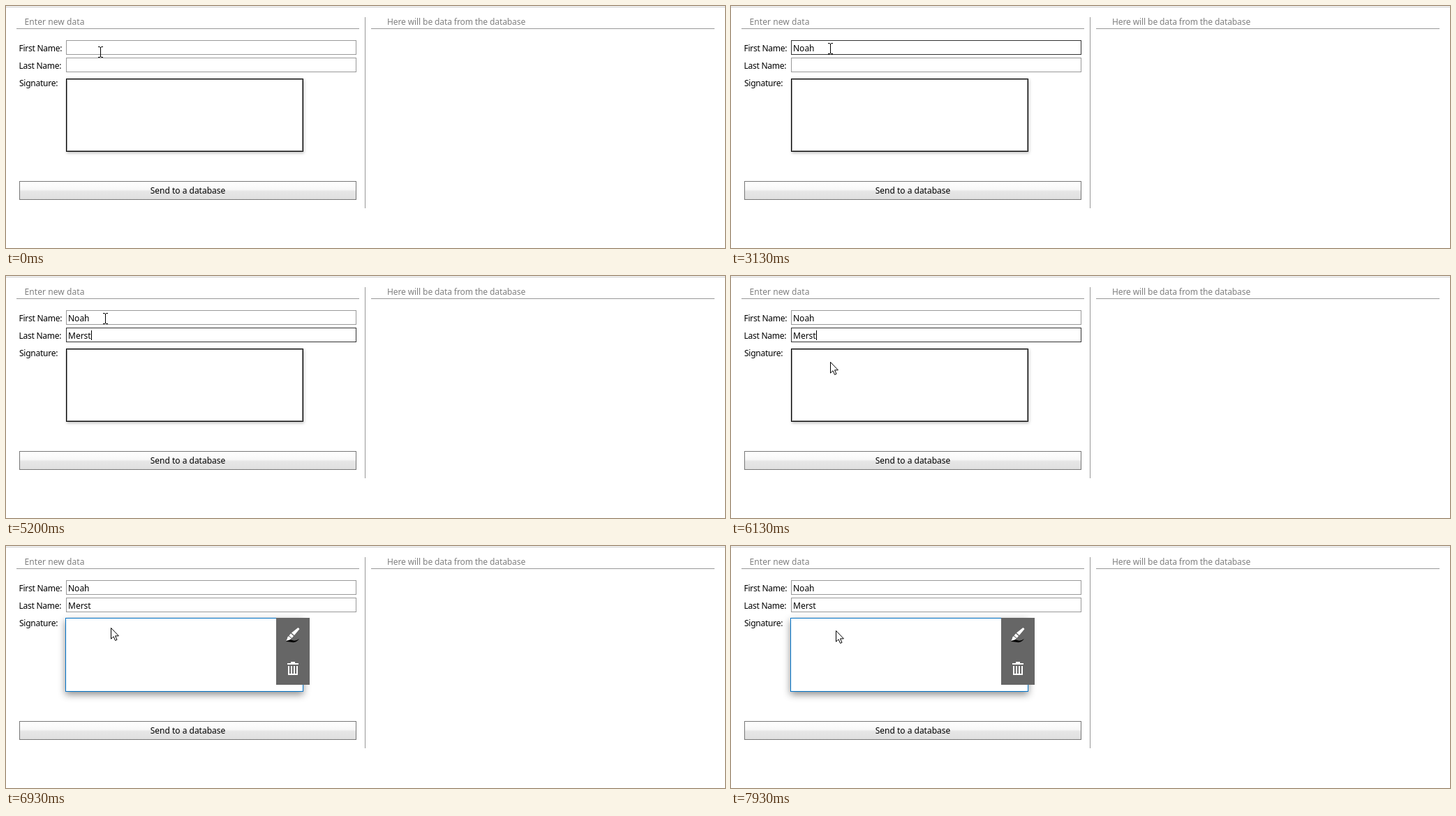
Animation of 1030 by 347 pixels, one loop 8000 ms. Source, as an HTML page:

```html
<!DOCTYPE html>
<html lang="en">
<head>
<meta charset="utf-8">
<title>Signature form</title>
<style>
  html, body { margin: 0; width: 100%; height: 100%; overflow: hidden; background: #fff; }
  svg { position: absolute; left: 0; top: 0; }
  text { font: 12px "Noto Sans", "Open Sans", sans-serif; white-space: pre; }
  .head { fill: #808080; }
  .label { letter-spacing: -.25px; }
  .rule { stroke: #999; }
  .field { fill: #fff; stroke: #999; }
  .field.focus { stroke: #333; }

  #pad {
    position: absolute; box-sizing: border-box;
    left: 86px; top: 104px; width: 340px; height: 105px;
    background: #fff; border: 1px solid #000;
    box-shadow: inset 0 0 0 1px rgba(0,0,0,.4), 1px 2px 4px rgba(0,0,0,.25);
  }
  #pad.active {
    left: 85px; top: 103px; width: 341px; height: 106px;
    border-color: #0072c6;
    box-shadow: 0 4px 10px rgba(0,0,0,var(--shade));
  }
</style>
</head>
<body>
<div id="pad"></div>
<svg width="1030" height="347" viewBox="0 0 1030 347">
  <defs>
    <linearGradient id="face" x2="0" y2="1">
      <stop offset="0" stop-color="#fff"/>
      <stop offset=".45" stop-color="#f7f7f7"/>
      <stop offset=".55" stop-color="#e6e6e6"/>
      <stop offset="1" stop-color="#e0e0e0"/>
    </linearGradient>
  </defs>

  <path d="M0 1.5H1030" stroke="#ccc"/>
  <path class="rule" d="M15 32.5H506M523 32.5H1015M514.5 16V290"/>
  <text class="head" x="26.5" y="27" letter-spacing=".08">Enter new data</text>
  <text class="head" x="546" y="27" letter-spacing="-.1">Here will be data from the database</text>

  <text class="label" x="18.5" y="65">First Name:</text>
  <text class="label" x="18.5" y="90">Last Name:</text>
  <text class="label" x="19" y="115">Signature:</text>
  <rect class="field" x="86.5" y="49.5" width="415" height="20"/>
  <rect class="field" x="86.5" y="74.5" width="415" height="20"/>
  <text class="value" x="89" y="65"></text>
  <text class="value" x="89" y="90"></text>
  <path id="caret" d="M.5 0V14" stroke="#000"/>

  <rect x="19.5" y="251.5" width="482" height="26" fill="url(#face)" stroke="#777"/>
  <text x="260.5" y="269" text-anchor="middle">Send to a database</text>

  <g id="tools">
    <rect x="387" y="103" width="48" height="96" fill="#666"/>
    <path d="M401 137Q405 133 410 135T420 133Q416 139 410 138T401 137Z" fill="#000"/>
    <path d="M418.5 117L420.5 119 413 128 409 124.5ZM408 125.5L412 129 409.5 132 405.5 128.5ZM404.8 129.2L408.8 132.5Q406 136 401 135.5 403 134 403 132 403.3 130 404.8 129.2Z" fill="#fff"/>
    <path d="M403 169H419M408 167H414" stroke="#fff" stroke-width="2"/>
    <path d="M405 172V184H417V172M409 172V184M413 172V184" fill="none" stroke="#fff" stroke-width="2"/>
  </g>

  <path id="beam" d="M-3 -7.5H-1L.5 -6.5 2 -7.5H4M.5 -7V7M-3 7.5H-1L.5 6.5 2 7.5H4" fill="none" stroke="#000"/>
  <path id="arrow" d="M.5 .5V16.2L4 12.8 6.6 18.5 9 17.4 6.5 11.9H11.4Z" fill="#fff" stroke="#000"/>
</svg>

<script>
  const LOOP = 8000;
  const FRAME = 1000 / 15;
  const BLINK = 490;
  const ARROW_FROM = 6000, CLICK = 6400;

  const entries = [
    { name: "Noah", focus: 530, blur: 3330, firstKey: 1650, keyGap: 440 },
    { name: "Merst", focus: 3330, blur: CLICK, firstKey: 3950, keyGap: 310 }
  ];

  // Pointer moves; it rests between them.
  const moves = [
    { from: 0, to: 330, x: 138, y: 58 },
    { from: 670, to: 800, x: 142, y: 61 },
    { from: 5800, to: 6000, x: 149, y: 98 },
    { from: 6000, to: 6200, x: 138, y: 135 },
    { from: 6400, to: 6530, x: 150, y: 117 },
    { from: 7070, to: 7670, x: 142, y: 148 },
    { from: 7670, to: 7930, x: 150, y: 121 }
  ];

  const byId = id => document.getElementById(id);
  const pad = byId("pad"), caret = byId("caret"), tools = byId("tools");
  const beam = byId("beam"), arrow = byId("arrow");
  const fields = document.querySelectorAll(".field");
  const values = document.querySelectorAll(".value");

  const ramp = (t, from, to) => Math.min(1, Math.max(0, (t - from) / (to - from)));
  const show = (el, on) => el.setAttribute("visibility", on ? "visible" : "hidden");
  const place = (el, x, y) => el.setAttribute("transform", `translate(${Math.round(x)} ${Math.round(y)})`);

  function pointerAt(t) {
    let x = 135, y = 66;
    for (const move of moves) {
      const p = ramp(t, move.from, move.to);
      x += (move.x - x) * p;
      y += (move.y - y) * p;
    }
    return [x, y];
  }

  function renderField(entry, i, t) {
    const { name, focus, blur, firstKey, keyGap } = entry;
    const typed = Math.max(0, Math.floor((t - firstKey) / keyGap) + 1);
    const focused = t >= focus && t < blur;
    values[i].textContent = name.slice(0, typed);
    fields[i].classList.toggle("focus", focused);
    if (!focused) return;

    // Blinking restarts when typing begins.
    const since = t - (typed ? firstKey : focus);
    const width = typed ? values[i].getComputedTextLength() : 0;
    place(caret, 89 + width, 53 + 25 * i);
    show(caret, Math.floor(since / BLINK) % 2 === 0);
  }

  function render(t) {
    show(caret, false);
    entries.forEach((entry, i) => renderField(entry, i, t));

    pad.classList.toggle("active", t >= CLICK);
    pad.style.setProperty("--shade", .35 + .1 * ramp(t, CLICK, 6530));
    tools.setAttribute("opacity", ramp(t, 6600, 6930));

    const pointing = t >= ARROW_FROM;
    show(arrow, pointing);
    show(beam, !pointing);
    place(pointing ? arrow : beam, ...pointerAt(t));
  }

  const start = performance.now();
  function tick() {
    const t = (performance.now() - start) % LOOP;
    render(Math.floor(t / FRAME + .1) * FRAME);
    requestAnimationFrame(tick);
  }
  tick();
</script>
</body>
</html>
```
